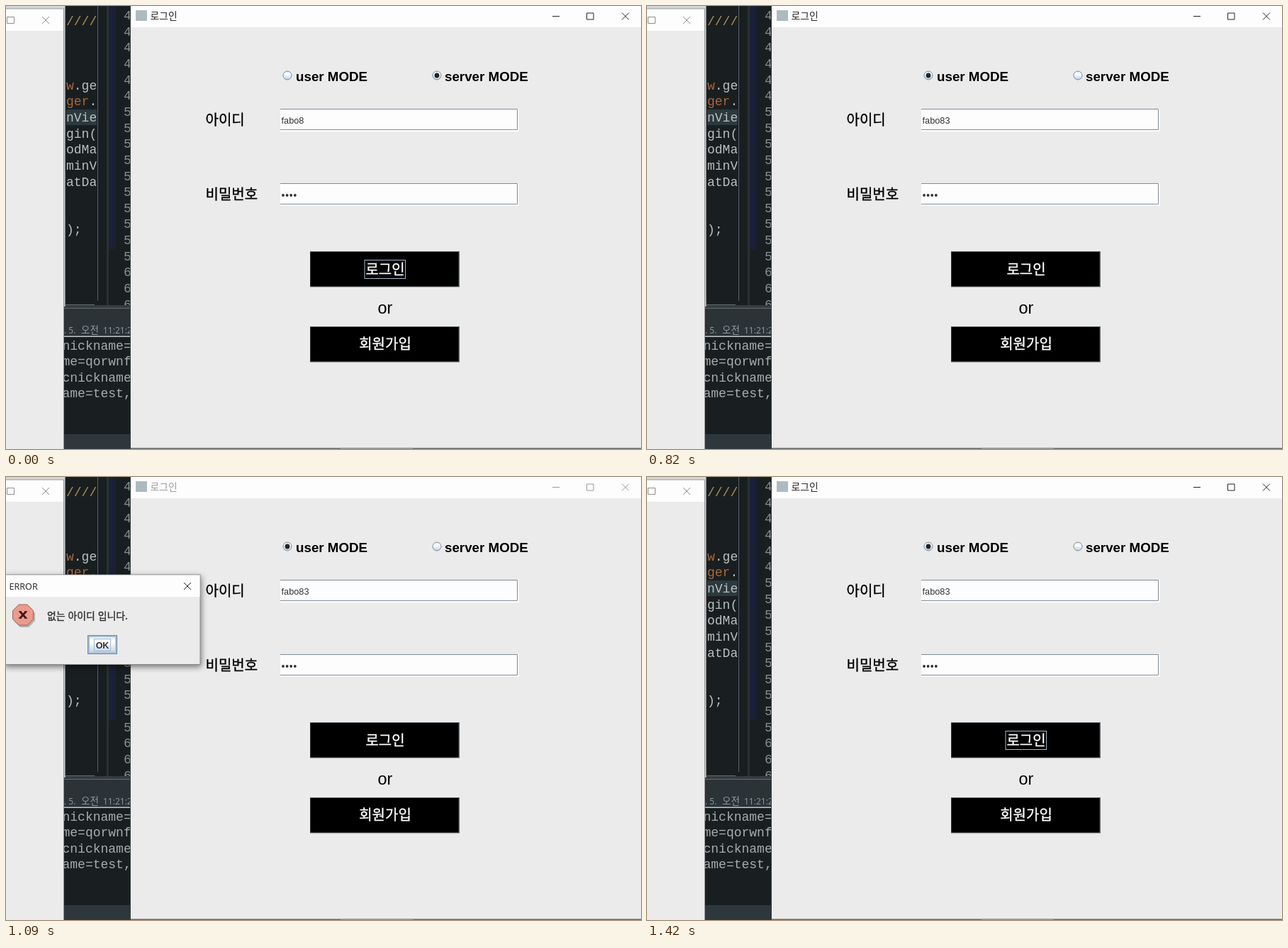
Recreate the animation shown at these times as an HTML page. Size 896 px wide and 625 px high, loop 1.45 s.

```html
<!DOCTYPE html>
<html lang="ko">
<head>
<meta charset="utf-8">
<title>로그인</title>
<style>
html, body { margin: 0; width: 100%; height: 100%; overflow: hidden; background: #191f20; }
svg { display: block; }
text { white-space: pre; }
.ko { font-family: "Noto Sans CJK KR", "Noto Sans CJK", sans-serif; }
.ui { font-family: "Open Sans", "Noto Sans CJK KR", sans-serif; }
.arial { font-family: "Liberation Sans", sans-serif; }
.code { font: 18px "Liberation Mono", monospace; fill: #b9c0c0; }
.label { font-size: 20px; stroke: #000; stroke-width: .35; }
.white { fill: #fff; stroke: #fff; }
.mid { text-anchor: middle; }
.line { fill: none; stroke: #222; }
.dim { stroke: #8e8e8e; }
.focus, .caret, .hover, .dot, .dialog, .more { visibility: hidden; }
.login-focus .focus, .typing .caret, .hovering .hover, .typed .more,
.user .user-dot, .server .server-dot, .alert .dialog { visibility: visible; }
.idle .title { fill: #999; }
.idle .controls { stroke: #999; }
.dialog { filter: drop-shadow(1px 3px 4px rgba(0, 0, 0, .5)); }
.behind .dialog { clip-path: url(#leftSide); filter: drop-shadow(0 1px 3px rgba(0, 0, 0, .4)); }
.behind .dialog-title { fill: #999; }
.pressed .ok { fill: #b3cbe2; }
</style>
</head>
<body>
<svg id="stage" width="896" height="625" viewBox="0 0 896 625">
  <defs>
    <clipPath id="editor"><rect x="84" width="43.5" height="424"/></clipPath>
    <clipPath id="numbers"><rect x="155" width="21" height="423"/></clipPath>
    <clipPath id="console"><rect x="81" y="427" width="95" height="198"/></clipPath>
    <clipPath id="leftSide"><rect x="-10" y="120" width="185" height="170"/></clipPath>
    <linearGradient id="glossy" x2="0" y2="1">
      <stop stop-color="#dfeaf3"/><stop offset=".35" stop-color="#fff"/><stop offset="1" stop-color="#b8cfe5"/>
    </linearGradient>
  </defs>

  <!-- code editor -->
  <rect width="896" height="625" fill="#191f20"/>
  <rect x="85" y="146" width="43" height="22" fill="#2c393e"/>
  <path d="M129.500 0V416" stroke="#596061"/>
  <rect x="142" width="3" height="424" fill="#2a3133"/>
  <rect x="145" width="10" height="343" fill="#1a2036"/>
  <g id="code" class="code" clip-path="url(#editor)"></g>
  <g id="digits" class="code" clip-path="url(#numbers)" style="fill:#879091"></g>

  <!-- console -->
  <rect x="81" y="422" width="95" height="5" fill="#343c3f"/>
  <path d="M84 421.500H125M81 426.500H176" stroke="#656d70"/>
  <rect x="81" y="427" width="95" height="39" fill="#2b3336"/>
  <rect x="81" y="465.500" width="95" height="1.500" fill="#c3c7c8"/>
  <rect x="81" y="604" width="95" height="21" fill="#2e383c"/>
  <g class="ui" clip-path="url(#console)" font-size="12" fill="#8f9da4">
    <text x="82" y="462">. 5.</text>
    <text class="ko" x="106" y="462" font-size="13.500">오전</text>
    <text x="137" y="462">11:21:25</text>
  </g>
  <g id="log" class="code" clip-path="url(#console)" style="fill:#a6adad"></g>

  <!-- left windows -->
  <rect width="83.500" height="424" fill="#d3d6d6"/>
  <path class="line dim" d="M0 4H81.500V625"/>
  <rect y="4.500" width="81" height="31" fill="#fdfdfd"/>
  <rect y="35.500" width="81" height="590" fill="#ebebeb"/>
  <path class="line dim" d="M1.500 15.500h10v9h-10zM51 15l10 10m0-10l-10 10"/>

  <!-- login window -->
  <g>
    <rect x="175" width="1" height="625" fill="#3d4445"/>
    <rect x="176" width="720" height="30" fill="#fdfdfd"/>
    <rect x="176" y="30" width="720" height="594" fill="#ebebeb"/>
    <rect x="176" y="623.500" width="720" height="1.500" fill="#666"/>
    <rect x="472" y="623.500" width="102" height="1.500" fill="#999"/>
    <rect x="183" y="6" width="16" height="15" fill="#aebac1"/>
    <text class="ko title" x="203.500" y="19" font-size="13.800" fill="#222">로그인</text>
    <path class="line controls" d="M771 14.500h10M819.500 10h9.500v9h-9.500zM869 9.500l10 10m0-10l-10 10"/>

    <g fill="url(#glossy)" stroke="#7a8a99">
      <circle cx="397" cy="98" r="6"/><circle cx="608" cy="98" r="6"/>
    </g>
    <circle class="hover line" cx="397" cy="98" r="4.500" style="stroke:#a9c6e0;stroke-width:2"/>
    <circle class="dot user-dot" cx="397" cy="98" r="3.400" fill="#222"/>
    <circle class="dot server-dot" cx="608" cy="98" r="3.400" fill="#222"/>
    <g class="arial" font-size="18.750" font-weight="700">
      <text x="409" y="106">user MODE</text><text x="619" y="106">server MODE</text>
    </g>

    <g class="ko label">
      <text x="281.500" y="168">아이디</text><text x="281.500" y="273">비밀번호</text>
    </g>
    <g id="fields"></g>
    <text class="arial" x="388.500" y="166" font-size="12.750" fill="#333">fabo8<tspan class="more">3</tspan></text>
    <path class="caret line" d="M420.500 153V169"/>
    <path d="M391 267h.01m5.600 0h.01m5.600 0h.01m5.600 0h.01" stroke="#333" stroke-width="3.800" stroke-linecap="round"/>

    <g id="buttons"></g>
    <rect class="focus line" x="506" y="358.500" width="57.500" height="26" style="stroke:#a3b8cc"/>
    <g class="ko label white mid">
      <text x="535" y="378.500">로그인</text><text x="535" y="484">회원가입</text>
    </g>
    <text class="arial mid" x="535" y="434" font-size="23.500">or</text>
  </g>

  <!-- error message -->
  <g class="dialog">
    <rect x="-2" y="138" width="276" height="126.500" fill="#ebebeb" stroke="#888"/>
    <rect y="138.500" width="273.500" height="30.500" fill="#fdfdfd"/>
    <text class="ui dialog-title" x="4.500" y="158.500" font-size="12.600" fill="#222">ERROR</text>
    <path class="line" d="M251 149l10 10m0-10l-10 10"/>
    <path d="M20 183h12l9 9v11l-9 9h-12l-9-9v-11z" fill="#777" opacity=".5"/>
    <path d="M18 180h12l8.500 8.500v12l-8.500 8.500h-12l-8.500-8.500v-12z" fill="#e99c8d" stroke="#a85d52" stroke-linejoin="round"/>
    <path d="M20 190l8 9m0-9l-8 9" stroke="#4a1512" stroke-width="2.700"/>
    <path d="M18 190h4m4 0h4m-12 9h4m4 0h4" stroke="#4a1512" stroke-width="1.500"/>
    <text class="ko" x="58" y="201" font-size="13.900" fill="#333" stroke="#333" stroke-width=".4">없는 아이디 입니다.</text>
    <rect class="ok" x="115.500" y="223.500" width="41" height="26" fill="url(#glossy)" stroke="#71859a"/>
    <rect class="line" x="117" y="225" width="38" height="23" style="stroke:#a9c1d8;stroke-width:2"/>
    <rect class="line" x="124.500" y="228.500" width="23" height="17" style="stroke:#a3b8cc"/>
    <text class="arial mid" x="136" y="241.500" font-size="12.500" font-weight="700" fill="#333">OK</text>
  </g>
</svg>
<script>
const LOOP = 1450, ROW = 22.65;
const stage = document.getElementById('stage');

function add(parent, tag, attrs, content = '') {
  const el = document.createElementNS('http://www.w3.org/2000/svg', tag);
  for (const key in attrs) el.setAttribute(key, attrs[key]);
  el.textContent = content;
  document.getElementById(parent).append(el);
  return el;
}

// [row, text, colour]
const code = [
  [0, '////', '#b08e5e'], [4, ' .ge'], [4, 'w', '#a9663f'], [5, 'ger', '#a9663f'], [5, '   .'],
  [6, 'nView'], [7, 'gin('], [8, 'odMa'], [9, 'minV'], [10, 'atDa'], [13, ');']
];
for (const [row, line, colour] of code) {
  const el = add('code', 'text', { x: 85, y: 27 + row * ROW }, line);
  if (colour) el.style.fill = colour;
}
for (let i = 0; i < 19; i++) {
  add('digits', 'text', { x: 166, y: 19 + i * ROW }, 44 + i);
}
['nickname=', 'me=qorwnf', 'cnickname', 'ame=test,'].forEach((line, i) =>
  add('log', 'text', { x: 79.5, y: 484.5 + i * ROW }, line));

for (const y of [145, 250]) {
  add('fields', 'rect', { x: 387, y, width: 337, height: 32, fill: '#fff' });
  add('fields', 'path', { d: `M387 ${y + .5}h334.500v29h-334.500`, fill: '#fdfdfd', stroke: '#7f8c99' });
}
for (const y of [346, 452]) {
  add('buttons', 'rect', { x: 429, y, width: 211, height: 50.5, fill: '#5c6468' });
  add('buttons', 'rect', { x: 429.5, y: y + 1, width: 209, height: 48.5, fill: '#000' });
}

// [start in ms, state]
const steps = [
  [0, 'server login-focus'],
  [170, 'server login-focus hovering'],
  [460, 'user login-focus hovering'],
  [490, 'user login-focus'],
  [530, 'user typing'],
  [790, 'user typed'],
  [880, 'user typed login-focus'],
  [1010, 'user typed idle'],
  [1050, 'user typed idle alert'],
  [1180, 'user typed idle alert pressed'],
  [1240, 'user typed alert pressed behind'],
  [1300, 'user typed'],
  [1330, 'user typed login-focus']
];

let state;
function draw(now) {
  const t = now % LOOP;
  const next = steps.findLast(([start]) => start <= t)[1];
  if (next !== state) stage.setAttribute('class', state = next);
  requestAnimationFrame(draw);
}
draw(performance.now());
</script>
</body>
</html>
```
